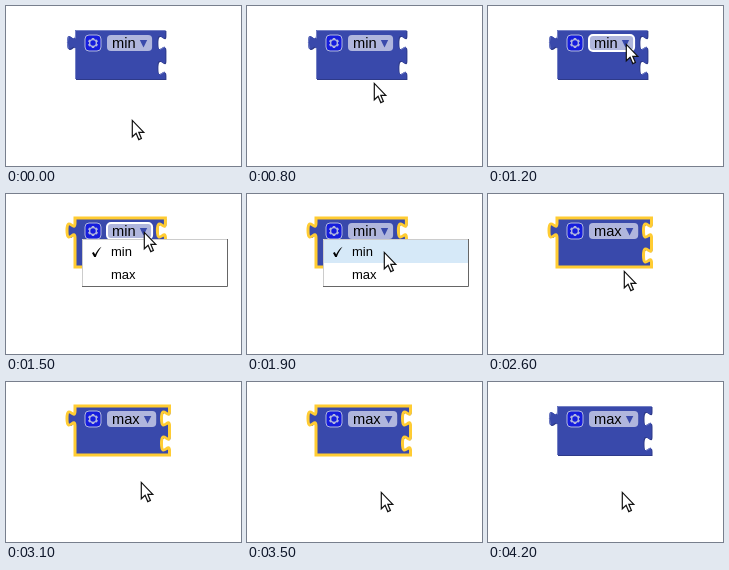
These frames come from a looping animation (235x160 px, 5.8 s). An HTML page:

```html
<!DOCTYPE html>
<html lang="en">
<head>
<meta charset="utf-8">
<title>Dropdown block</title>
<style>
  html, body { margin: 0; width: 100%; height: 100%; overflow: hidden; background: #fff; }
  svg { display: block; width: 100%; height: 100%; }
  text { font-family: "Liberation Sans", Arial, sans-serif; font-size: 14.67px; fill: #000; }
  .menu text { font-size: 13px; }
</style>
</head>
<body>
<svg viewBox="0 0 235 160">
  <g transform="translate(69 24)">
    <path id="dark" fill="#2e3a89" transform="translate(1 1)"/>
    <path id="block" fill="#3949ab" stroke="#fc3" stroke-width="3"/>
    <path id="light" fill="none" stroke="#7480c4" stroke-linecap="round"/>
  </g>

  <g transform="translate(79 29)" opacity=".6">
    <rect width="16" height="16" rx="4" fill="#00f" stroke="#fff"/>
    <circle cx="8" cy="8" r="4" fill="#fff"/>
    <g id="teeth" fill="#fff"></g>
    <circle cx="8" cy="8" r="2.7" fill="#00f"/>
  </g>

  <rect id="field" x="101" y="29" height="16" rx="4" fill="#fff" fill-opacity=".6" stroke="#fff" stroke-width="2"/>
  <text id="label" x="106" y="42"></text>
  <path id="arrow" d="M0 34h7.4l-3.7 7.6z" fill="#3949ab"/>

  <g id="menu" class="menu">
    <rect x="76" y="45" width="146" height="48" fill="#fff"/>
    <rect id="hot" x="77" width="144" height="23" fill="#d6e9f8"/>
    <path d="M76.5 93V45.5H222" fill="none" stroke="#ccc"/>
    <path d="M76 92.5H221.5V45" fill="none" stroke="#666"/>
    <path d="M86 59l1.8-.9 1.3 2.4C91 57 93 54.3 95.5 52.8 93 56 91 59.5 89.8 63h-1.6z"/>
    <text x="105" y="62">min</text>
    <text x="105" y="85">max</text>
  </g>

  <path id="cursor" d="M.3 .4V16.8L4.1 13.3 6.8 19.6 9.4 18.5 6.8 12.3H11.8Z" fill="#fff" stroke="#111" stroke-width="1.2"/>
</svg>
<script>
const LOOP = 5800, STEP = 100;
const OPEN = 1500, PICK = 2600, BLUR = 4200;
const $ = id => document.getElementById(id);
const set = (id, name, value) => $(id).setAttribute(name, value);

// pointer stops: time, x, y
const stops = [
  [100, 126, 114], [400, 126, 85], [700, 126, 85], [800, 127, 77],
  [1200, 138, 38], [1700, 138, 38], [2100, 136, 77], [2800, 136, 77],
  [3200, 135, 108], [3300, 135, 108], [3500, 134, 110]
];

const clamp = v => Math.min(1, Math.max(0, v));

function pointer(t) {
  const next = Math.max(1, stops.findIndex(s => s[0] > t));
  const i = t >= stops.at(-1)[0] ? stops.length - 1 : next;
  const [t0, x0, y0] = stops[i - 1], [t1, x1, y1] = stops[i];
  const p = clamp((t - t0) / (t1 - t0));
  return [Math.round(x0 + (x1 - x0) * p), Math.round(y0 + (y1 - y0) * p)];
}

const textWidth = { min: 23.6, max: 27.7 };
const socket = "c0 10-8-8-8 7.5s8-2.5 8 7.5";
const outline = w =>
  `M0 0H${w}v5${socket}v10${socket}V49H0V20c0-10-8 8-8-7.5s8 2.5 8-7.5z`;
const glint = (w, y) => `M${w - 5} ${y + 19.3}l3.7-2.1`;
const highlight = w =>
  `M.5 48.5V18.5m-7.4-.5q-1.5-5.5 0-11m7.4 1V.5H${w - .5}` + glint(w, 0) + glint(w, 25);

for (let angle = 0; angle < 360; angle += 60) {
  const tooth = document.createElementNS("http://www.w3.org/2000/svg", "path");
  tooth.setAttribute("d", "M6.5 11L6.9 13.1H9.1L9.5 11z");
  tooth.setAttribute("transform", `rotate(${angle} 8 8)`);
  $("teeth").append(tooth);
}

function draw(time) {
  const t = Math.floor(time / STEP) * STEP;
  const [x, y] = pointer(t);
  const open = t >= OPEN && t < PICK;
  const glow = t < OPEN ? 0 : clamp((BLUR - t) / (2 * STEP));
  const row = Math.floor((y - 46) / 23);
  const word = t < PICK ? "min" : "max";
  const w = textWidth[word];
  const shape = outline(w + 66.8);

  set("dark", "d", shape);
  set("block", "d", shape);
  set("block", "stroke-opacity", glow);
  set("light", "d", highlight(w + 66.8));
  set("light", "opacity", 1 - glow);
  set("field", "width", w + 21.5);
  set("field", "stroke-opacity", y < 46 ? 1 : 0);
  $("label").textContent = word;
  set("arrow", "transform", `translate(${w + 110.2} 0)`);

  set("menu", "visibility", open ? "visible" : "hidden");
  set("hot", "y", 46 + 23 * row);
  set("hot", "opacity", row < 0 ? 0 : 1);
  set("cursor", "transform", `translate(${x} ${y})`);
}

const start = performance.now();
function tick() {
  draw((performance.now() - start) % LOOP);
  requestAnimationFrame(tick);
}
tick();
</script>
</body>
</html>
```
